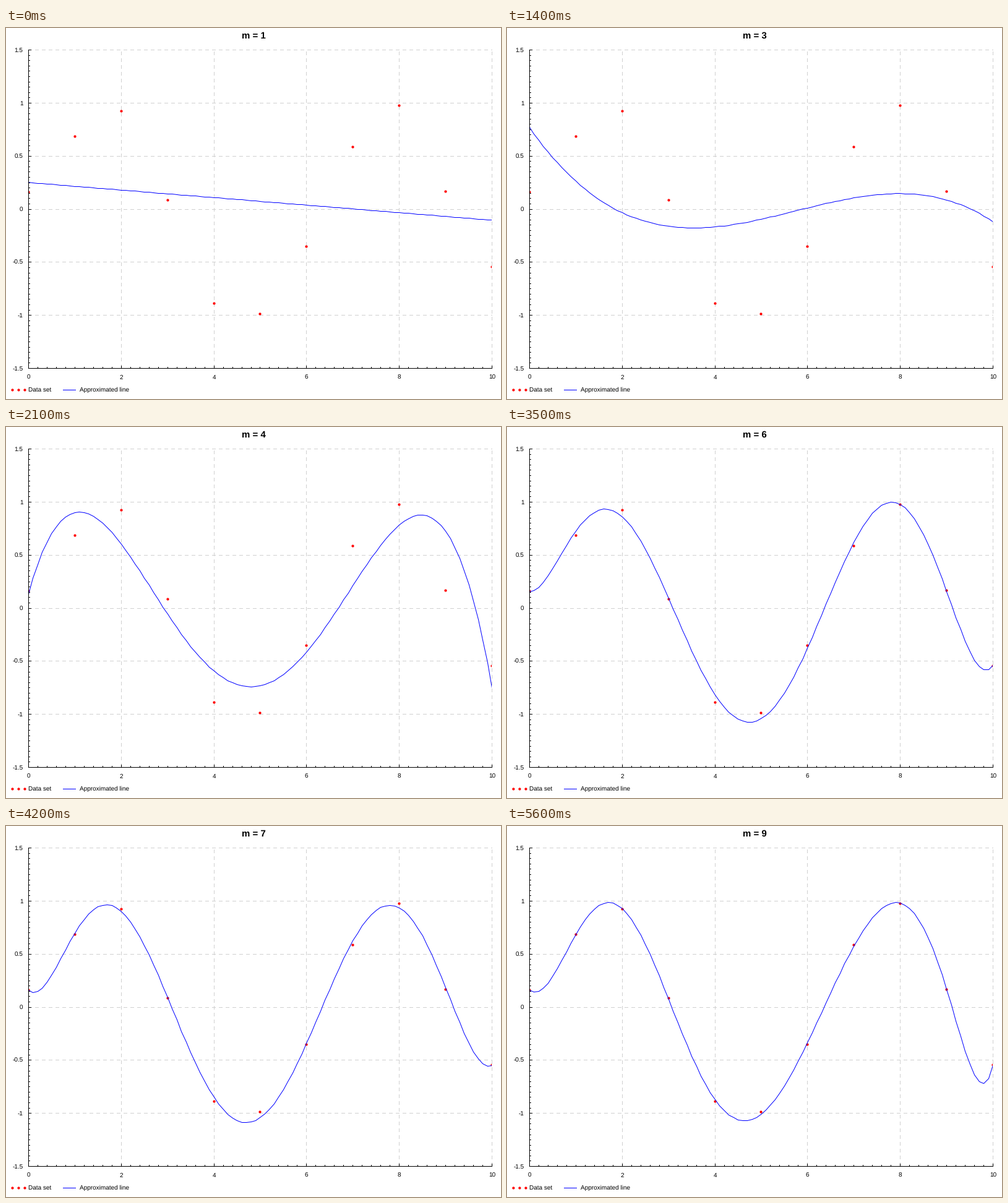
Recreate the animation shown at these times as a matplotlib script. Size 800 px wide and 600 px high, loop 6.3 s.

```python
import numpy as np
import matplotlib.pyplot as plt
from matplotlib.animation import FuncAnimation
from matplotlib.patches import Circle, Rectangle

W, H, DPI = 800, 600, 100
PX = 72 / DPI  # one pixel in points
LEFT, TOP, RIGHT, BOTTOM = 36, 35, 785, 550

X = np.arange(11)
Y = np.array([0.16, 0.6845, 0.9233, 0.0845, -0.8883, -0.9874,
              -0.3524, 0.5854, 0.9757, 0.166, -0.545])
GRID_X = np.linspace(0, 10, 101)

plt.rcParams.update({
    "font.family": "Liberation Sans",
    "text.hinting": "no_hinting",
    "text.kerning_factor": 6,
    "path.snap": False,
})
fig = plt.figure(figsize=(W / DPI, H / DPI), dpi=DPI, facecolor="white")
ax = fig.add_axes([0, 0, 1, 1])
ax.set_xlim(0, W)
ax.set_ylim(H, 0)
ax.axis("off")


def whole(v):
    """Nearest whole pixel, halves going down."""
    return np.ceil(np.asarray(v) - 0.5 - 1e-6)


def to_x(x):
    return LEFT + whole((RIGHT - LEFT) * np.asarray(x) / 10) + 0.5


def to_y(y):
    return BOTTOM - whole((BOTTOM - TOP) * (np.asarray(y) + 1.5) / 3) + 0.5


def line(x0, y0, x1, y1, color="black", **kw):
    return ax.plot([x0, x1], [y0, y1], color=color, lw=PX,
                   solid_capstyle="butt", dash_capstyle="butt", **kw)[0]


def label(x, y, text, size=10, **kw):
    return ax.text(x, y, text, fontsize=size * PX, va="baseline", **kw)


def dot(x, y):
    return ax.add_patch(Circle((x, y), 2.1, fc="red", ec="none", zorder=2))


# Grid, major ticks and their labels
grid = dict(color="#d0d0d0", dashes=(6, 5), zorder=1)
for v in range(0, 11, 2):
    x = float(to_x(v))
    if v:
        line(x, BOTTOM, x, TOP, **grid)
    line(x, BOTTOM + 1, x, BOTTOM - 4, zorder=5)
    label(x, 568, str(v), ha="center")
for v in np.arange(-1.5, 1.6, 0.5):
    y = float(to_y(v))
    if v > -1.5:
        line(LEFT, y, RIGHT + 1, y, **grid)
    line(LEFT, y, LEFT + 5, y, zorder=5)
    label(27.5, y + 3.5, f"{v:g}".replace("\u2212", "-"), ha="right")

# Minor ticks and axes
for v in np.linspace(0, 10, 51):
    x = float(to_x(v))
    line(x, BOTTOM + 1, x, BOTTOM - 2, zorder=5)
for v in np.linspace(-1.5, 1.5, 61):
    y = float(to_y(v))
    line(LEFT, y, LEFT + 3, y, zorder=5)
line(LEFT + 0.5, TOP, LEFT + 0.5, BOTTOM + 1, zorder=5)
line(LEFT, BOTTOM + 0.5, RIGHT + 1, BOTTOM + 0.5, zorder=5)

# Data points, cut off at the plot edges
area = Rectangle((LEFT, TOP), RIGHT - LEFT, BOTTOM - TOP,
                 transform=ax.transData)
for px, py in zip(to_x(X), to_y(Y)):
    dot(px, py).set_clip_path(area)

# Legend
for x in (10.5, 20.5, 30.5):
    dot(x, 585.5)
label(36, 588, "Data set")
line(92, 585.5, 113, 585.5, color="blue")
label(119, 588, "Approximated line")

title = label(400.5, 17, "", 15, ha="center", weight="bold")
curve, = ax.plot([], [], color="blue", lw=PX, zorder=3)
curve.set_clip_path(area)


def draw(i):
    degree = i + 1
    fit = np.polynomial.Polynomial.fit(X, Y, degree)
    curve.set_data(to_x(GRID_X), to_y(fit(GRID_X)))
    title.set_text(f"m = {degree}")
    return curve, title


anim = FuncAnimation(fig, draw, frames=9, interval=700, repeat=True,
                     repeat_delay=0)
plt.show()
```
